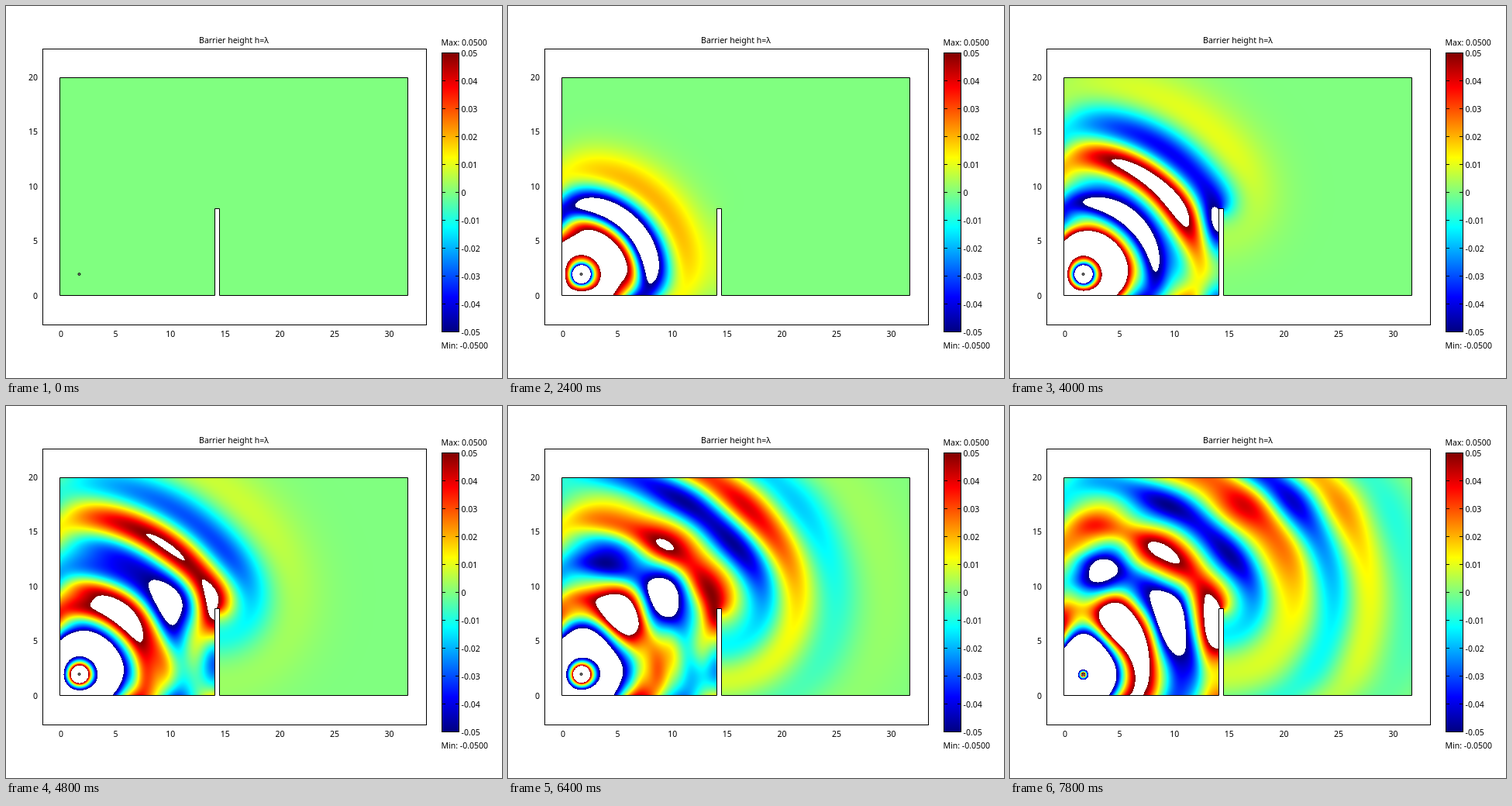
Recreate the animation shown at these times as an HTML page with a canvas. Size 640 by 480 pixels, loop 8000 ms.

```html
<!DOCTYPE html>
<html lang="en">
<head>
<meta charset="utf-8">
<title>Barrier height</title>
<style>
  html, body { margin: 0; width: 100%; height: 100%; overflow: hidden; background: #fff; }
  canvas { position: absolute; left: 70px; top: 93px; }
  svg { position: absolute; left: 0; top: 0; }
  text { font: 10.5px "Noto Sans", "Open Sans", sans-serif; fill: #000; }
</style>
</head>
<body>
<canvas id="field" width="448" height="280"></canvas>
<svg id="plot" width="640" height="480" viewBox="0 0 640 480">
  <defs><linearGradient id="jet" x1="0" y1="0" x2="0" y2="1"></linearGradient></defs>
  <g fill="none" stroke="#000">
    <rect x="47.5" y="55.5" width="495" height="356"/>
    <path d="M69.5 92.5H518.5V373.5H275.5V261.5H269.5V373.5H69.5Z"/>
    <circle cx="94.5" cy="346" r="1.5" fill="#888"/>
    <rect x="562.5" y="60.5" width="22" height="360" fill="url(#jet)"/>
    <path id="ticks"/>
  </g>
</svg>
<script>
const NS = 'http://www.w3.org/2000/svg';
const plot = document.getElementById('plot');
const ctx = document.getElementById('field').getContext('2d');

function add(parent, tag, attrs, text) {
  const el = document.createElementNS(NS, tag);
  for (const key in attrs) el.setAttribute(key, attrs[key]);
  if (text !== undefined) el.textContent = text;
  parent.appendChild(el);
}
const label = (x, y, text, anchor = 'start') =>
  add(plot, 'text', { x, y, 'text-anchor': anchor }, text);

// Jet colours for v in 0..1
function jet(v) {
  const ch = c => Math.round(255 * Math.max(0, Math.min(1, 1.5 - Math.abs(4 * v - c))));
  return [ch(3), ch(2), ch(1)];
}

function drawAxes() {
  label(294, 48, 'Barrier height h=λ', 'middle');
  label(561.5, 51, 'Max: 0.0500');
  label(561.5, 442, 'Min: -0.0500');
  for (let i = 0; i <= 6; i++) label(71 + 70.6 * i, 427, 5 * i, 'middle');
  for (let i = 0; i <= 4; i++) label(41, 378 - 70.6 * i, 5 * i, 'end');
  let d = '';
  for (let i = -5; i <= 5; i++) {
    const y = 240.5 - 36 * i;
    label(587.5, y + 4.5, i ? (i / 100).toFixed(2) : '0');
    d += `M562 ${y}h5M580 ${y}h5`;
  }
  document.getElementById('ticks').setAttribute('d', d);
  for (let i = 0; i <= 8; i++) {
    add(document.getElementById('jet'), 'stop',
      { offset: i / 8, 'stop-color': `rgb(${jet(1 - i / 8)})` });
  }
}

// Wave equation, open outer edges, hard barrier.
// Units: barrier height 8, speed 1, one time unit per picture, period 8.
const W = 448, H = 280, P = W + 2, SIZE = P * (H + 2);
const CELL = 1 / 14.1, POWER = 0.78, LIMIT = 0.05;
const STEPS = 40, STEP_MS = 200, SWEEPS = 60, RELAX = 1.81;

// Generalized-alpha time stepping; RHO damps the fastest ripples.
const RHO = 0.75;
const OLD_A = (2 * RHO - 1) / (1 + RHO), OLD_U = RHO / (1 + RHO);
const NEW_A = 1 - OLD_A, NEW_U = 1 - OLD_U;
const GAMMA = 0.5 - OLD_A + OLD_U, BETA = (1 - OLD_A + OLD_U) ** 2 / 4;
const MASS = CELL * CELL * NEW_A / (NEW_U * BETA);
const EDGE = CELL * GAMMA / BETA;

const at = (x, y) => (y + 1) * P + x + 1;
const SOURCE = at(24, 253);
const FIRST = P + 1, END = SIZE - P - 1;

const inside = (x, y) => x >= 0 && y >= 0 && x < W && y < H;
const solid = (x, y) => x >= 200 && x <= 204 && y >= 169;

const grid = () => new Float32Array(SIZE);
const gain = grid();                      // 1 / diagonal, 0 where there is no fluid
const open = grid();                      // open faces per cell
const u = grid(), v = grid(), a = grid(); // pressure and its time derivatives
const guess = grid(), mid = grid(), rhs = grid();
let done = 0;
const pictures = [];

function buildGrid() {
  for (let y = 0; y < H; y++) for (let x = 0; x < W; x++) {
    if (solid(x, y)) continue;
    let links = 0, edges = 0;
    for (const [dx, dy] of [[1, 0], [-1, 0], [0, 1], [0, -1]]) {
      if (!inside(x + dx, y + dy)) edges++;
      else if (!solid(x + dx, y + dy)) links++;
    }
    const k = at(x, y);
    open[k] = edges;
    gain[k] = 1 / (MASS + links + EDGE * edges);
  }
}

function advance() {
  const s = n => Math.cos(Math.PI * n / 4);
  for (let k = FIRST; k < END; k++) {
    guess[k] = u[k] + NEW_U * (v[k] + (0.5 - BETA) * a[k]);
    rhs[k] = MASS * guess[k] - CELL * CELL * OLD_A * a[k]
      + open[k] * (EDGE * guess[k] - CELL * (v[k] + NEW_U * (1 - GAMMA) * a[k]));
  }
  rhs[SOURCE] += POWER * (OLD_U * s(done) + NEW_U * s(done + 1));
  for (let n = 0; n < SWEEPS; n++) {
    for (let k = FIRST; k < END; k++) {
      const g = gain[k];
      if (g === 0) continue;
      const sum = mid[k - 1] + mid[k + 1] + mid[k - P] + mid[k + P] + rhs[k];
      mid[k] += RELAX * (sum * g - mid[k]);
    }
  }
  for (let k = FIRST; k < END; k++) {
    if (gain[k] === 0) continue;
    const next = (mid[k] - guess[k]) / (NEW_U * BETA);
    u[k] += v[k] + (0.5 - BETA) * a[k] + BETA * next;
    v[k] += (1 - GAMMA) * a[k] + GAMMA * next;
    a[k] = next;
  }
  done++;
}

const shades = Array.from({ length: 1025 }, (_, i) => jet(i / 1024));

function paint() {
  const img = ctx.createImageData(W, H), px = img.data;
  px.fill(255);
  for (let y = 0, o = 0; y < H; y++) for (let x = 0; x < W; x++, o += 4) {
    const p = u[at(x, y)];
    if (solid(x, y) || Math.abs(p) > LIMIT) continue;
    const c = shades[Math.round((p / LIMIT + 1) * 512)];
    px[o] = c[0]; px[o + 1] = c[1]; px[o + 2] = c[2];
  }
  return img;
}

function picture(n) {
  while (pictures.length <= n) {
    if (pictures.length) advance();
    pictures.push(paint());
  }
  return pictures[n];
}

let shown = -1;
function render(t) {
  const n = Math.floor(t / STEP_MS) % STEPS;
  if (n !== shown) ctx.putImageData(picture(n), 0, 0);
  shown = n;
}

function tick() {
  render(performance.now());
  requestAnimationFrame(tick);
}

drawAxes();
buildGrid();
render(0);
tick();
</script>
</body>
</html>
```
